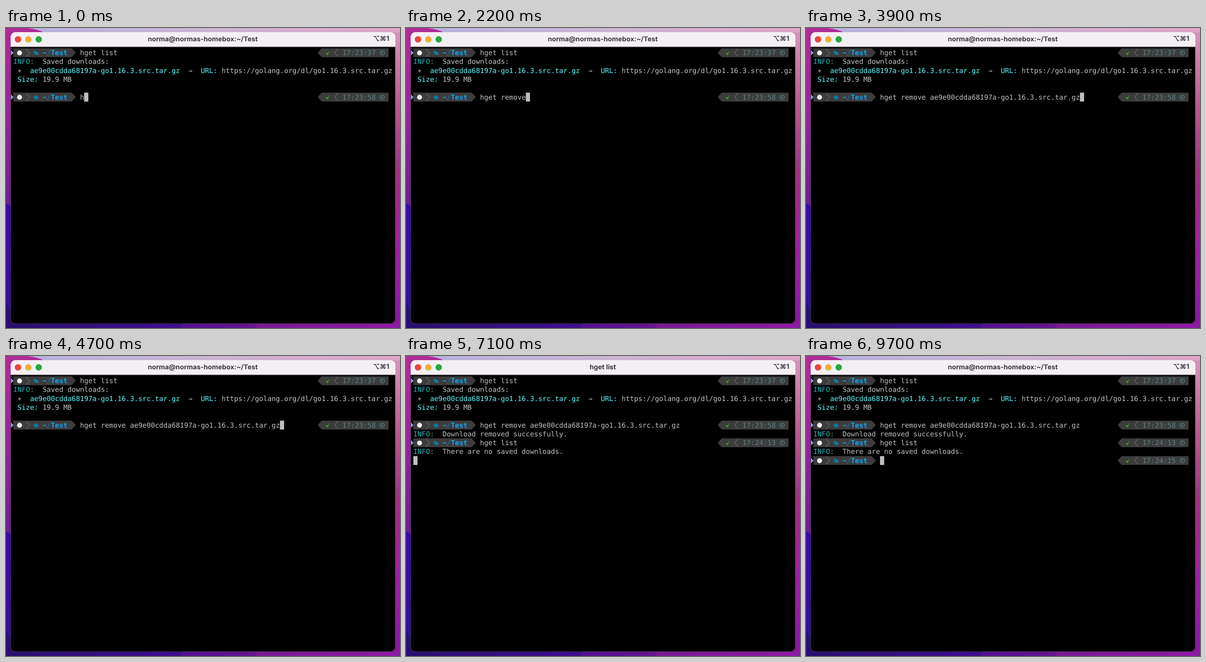
These frames come from a looping animation (857x653 px, 9800 ms). An HTML page:

```html
<!DOCTYPE html>
<html lang="en">
<head>
<meta charset="utf-8">
<title>Terminal</title>
<style>
  html, body { margin: 0; width: 100%; height: 100%; overflow: hidden; background: #000; }
  svg { display: block; width: 857px; height: 653px; }
  text { white-space: pre; text-rendering: geometricPrecision; }
  #screen { font: 15.05px "DejaVu Sans Mono", monospace; }
  .bar { font: 700 14.6px Inter, "DejaVu Sans", sans-serif; fill: #3b383b; }
</style>
</head>
<body>
<svg viewBox="0 0 857 653" xmlns="http://www.w3.org/2000/svg">
  <defs>
    <linearGradient id="top">
      <stop offset="0" stop-color="#b5b0dc"/><stop offset=".5" stop-color="#c9b5d5"/><stop offset="1" stop-color="#dda3c4"/>
    </linearGradient>
    <linearGradient id="left" x2="0" y2="1">
      <stop offset="0" stop-color="#b02b96"/><stop offset=".25" stop-color="#982896"/><stop offset=".6" stop-color="#691e90"/>
    </linearGradient>
    <linearGradient id="violet" x2="0" y2="1">
      <stop offset="0" stop-color="#3f0aac"/><stop offset="1" stop-color="#320f92"/>
    </linearGradient>
    <linearGradient id="right" x2="0" y2="1">
      <stop offset="0" stop-color="#d695b8"/><stop offset=".22" stop-color="#bd6090"/><stop offset=".45" stop-color="#a03583"/>
      <stop offset=".6" stop-color="#a02692"/><stop offset=".75" stop-color="#9c20a4"/><stop offset="1" stop-color="#8a16a4"/>
    </linearGradient>
    <linearGradient id="bottom">
      <stop offset="0" stop-color="#291070"/><stop offset=".44" stop-color="#3d0f8c"/><stop offset=".45" stop-color="#54128f"/>
      <stop offset=".63" stop-color="#64148f"/><stop offset=".64" stop-color="#7a1893"/><stop offset="1" stop-color="#8e1aa4"/>
    </linearGradient>
  </defs>

  <rect width="857" height="653" fill="url(#top)"/>
  <rect y="9" width="430" height="644" fill="url(#left)"/>
  <path d="M0 0H47Q70 3 86 11H0Z" fill="#b02c98"/>
  <path d="M0 382L20 390V653H0Z" fill="url(#violet)"/>
  <rect x="430" y="9" width="427" height="644" fill="url(#right)"/>
  <rect y="640" width="857" height="13" fill="url(#bottom)"/>
  <path d="M0 598L30 653H0Z" fill="#291070"/>

  <rect x="10" y="20" width="837" height="623.500" rx="11"/>
  <path d="M10 41V20A11 11 0 0 1 21 9H836A11 11 0 0 1 847 20V41Z" fill="#f4eff3"/>
  <rect x="10" y="40.500" width="837" height="1" fill="#8a878a"/>
  <path d="M10.500 42V632.500A10.500 10.500 0 0 0 21 643H836A10.500 10.500 0 0 0 846.500 632.500V42" fill="none" stroke="#555" stroke-opacity=".6"/>
  <circle cx="26" cy="24.700" r="7" fill="#e9473f"/>
  <circle cx="48.700" cy="24.700" r="7" fill="#efb136"/>
  <circle cx="71.200" cy="24.700" r="7" fill="#28a83a"/>
  <text id="title" class="bar" x="428" y="29" text-anchor="middle"></text>
  <text class="bar" x="833.500" y="28" text-anchor="end">⌥⌘1</text>
  <g id="screen"></g>
</svg>
<script>
const LOOP = 9800, CELL = 9.06, LINE = 19.3, LEFT = 16, TOP = 44.2;
const GREY = '#c2c2c2', TEAL = '#23b4b8', CYAN = '#62f7f8', SEG = '#3c3c3c';
const HOST = 'norma@normas-homebox:~/Test';
const FILE = 'ae9e00cdda68197a-go1.16.3.src.tar.gz';
const REMOVE = 'hget remove ' + FILE;

const screen = document.getElementById('screen');
const title = document.getElementById('title');
const colX = c => LEFT + c * CELL;
const rowY = r => TOP + r * LINE;

function add(parent, tag, attrs, content = '') {
  const el = document.createElementNS('http://www.w3.org/2000/svg', tag);
  for (const key in attrs) el.setAttribute(key, attrs[key]);
  el.textContent = content;
  parent.append(el);
  return el;
}

const timed = [];
function line(row, from = 0) {
  const g = add(screen, 'g', { transform: `translate(0 ${rowY(row)})` });
  timed.push({ g, from });
  return g;
}

const write = (g, col, str, fill = GREY, weight = 400) =>
  add(g, 'text', { x: colX(col), y: 14.9, fill, 'font-weight': weight }, str);

const shape = (g, d, fill, stroke = 'none', width = 1) =>
  add(g, 'path', { d, fill, stroke, 'stroke-width': width });

function prompt(row, clock, from) {
  const g = line(row, from);
  shape(g, 'M11 4L16.200 9.700L11 15.500Z', '#86b3f5');
  shape(g, 'M16 0H142.800L152 9.600L142.800 19.200H16Z', SEG);
  add(g, 'circle', { cx: 29.5, cy: 10, r: 5.4, fill: '#eee' });
  shape(g, 'M43.500 1L51.500 9.600L43.500 18.200', 'none', '#8a8a8a');
  shape(g, 'M60.500 13.500V6H64.500L65.500 7.200H69V9H62.800Z', '#0b82a8');
  shape(g, 'M61.500 14L63.500 9.800H71.500L69.300 14Z', '#0b82a8');
  write(g, 7, '~', '#16a3ee', 700);
  write(g, 8, '/', '#0b82a8');
  write(g, 9, 'Test', '#16a3ee', 700);

  shape(g, 'M832 0H686.500L678 9.600L686.500 19.200H832Z', SEG);
  shape(g, 'M695.800 10.800L698 9.600L699.300 11.700Q701.300 7.600 704.800 5.300Q701.500 9.500 699.500 14.500H698.300Z', '#55a814');
  shape(g, 'M722.500 1L714.500 9.600L722.500 18.200', 'none', '#8a8a8a');
  write(g, 79, clock, '#5d8082');
  add(g, 'circle', { cx: 818.5, cy: 9.8, r: 4.8, fill: 'none', stroke: '#5d8082', 'stroke-width': 1.3 });
  shape(g, 'M818.500 6.500V10.200H815.800', 'none', '#5d8082', 1.1);
}

function info(row, msg, from) {
  const g = line(row, from);
  write(g, 0, 'INFO:', TEAL);
  write(g, 7, msg);
}

prompt(0, '17:23:37');
write(line(0), 16, 'hget list');
info(1, 'Saved downloads:');
const entry = line(2);
write(entry, 1, '∗');
write(entry, 4, FILE, CYAN);
write(entry, 42, '⇒');
write(entry, 45, 'URL:', CYAN);
write(entry, 50, 'https://golang.org/dl/go1.16.3.src.tar.gz');
const size = line(3);
write(size, 1, 'Size:', CYAN);
write(size, 7, '19.9 MB');
prompt(5, '17:23:58');
info(6, 'Download removed successfully.', 5000);
prompt(7, '17:24:13', 5100);
info(8, 'There are no saved downloads.', 7100);
prompt(9, '17:24:15', 7200);

// keys: [time, characters typed so far]
const inputs = [
  { row: 5, str: REMOVE, keys: [[0, 1], [400, 2], [700, 3], [900, 4], [1000, 5], [1200, 6], [1400, 7],
    [1500, 8], [1700, 9], [1900, 10], [2100, 11], [2400, 12], [3200, REMOVE.length]] },
  { row: 7, str: 'hget list', keys: [[5600, 1], [5800, 2], [6000, 3], [6200, 4], [6300, 5], [6400, 6],
    [6500, 7], [6600, 8], [6700, 9]] }
];
for (const input of inputs) input.el = write(line(input.row), 16, '');

// [time, row, title]; on input rows the cursor follows the typed text
const phases = [
  [0, 5, HOST], [5000, 7, REMOVE], [5100, 7, HOST],
  [7100, 9, 'hget list'], [7200, 9, HOST]
];
const cursor = add(screen, 'rect', { width: CELL, height: LINE, fill: '#bfbfbf' });

const latest = (steps, t) => steps.filter(s => s[0] <= t).pop();

function render(t) {
  for (const { g, from } of timed) g.setAttribute('visibility', t >= from ? 'visible' : 'hidden');
  const [, row, name] = latest(phases, t);
  let col = name === HOST ? 16 : 0;
  for (const input of inputs) {
    const typed = (latest(input.keys, t) || [0, 0])[1];
    input.el.textContent = input.str.slice(0, typed);
    if (input.row === row && name === HOST) col += typed;
  }
  title.textContent = name;
  cursor.setAttribute('x', colX(col));
  cursor.setAttribute('y', rowY(row));
}

const start = performance.now();
function tick() {
  render((performance.now() - start) % LOOP);
  requestAnimationFrame(tick);
}
tick();
</script>
</body>
</html>
```
